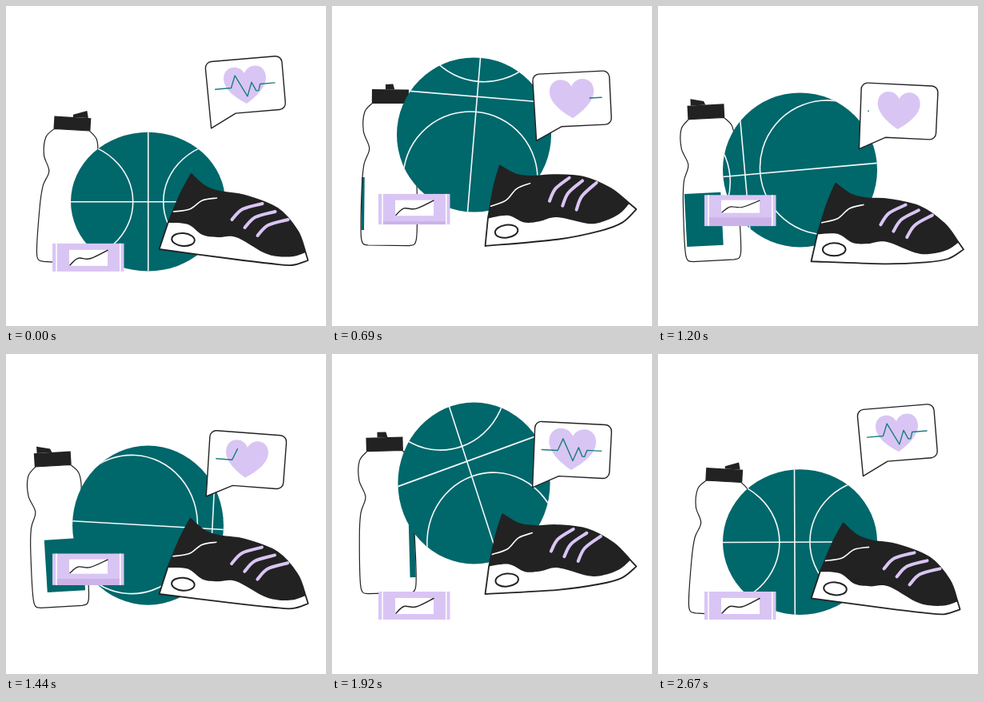
These frames come from a looping animation (400x400 px, 2.7 s). An HTML page with a canvas:

```html
<!DOCTYPE html>
<html lang="en">
<head>
<meta charset="utf-8">
<style>
html, body { margin: 0; width: 100%; height: 100%; overflow: hidden; background: #fff; }
canvas { display: block; }
</style>
</head>
<body>
<canvas id="stage" width="400" height="400"></canvas>
<script>
const ctx = document.getElementById('stage').getContext('2d');
const LOOP = 2700, FIRST_BOUNCE = 1335;
const TEAL = '#00676b', BLACK = '#222', LILAC = '#d9c5f4', LILAC_DARK = '#cbb3ea', WHITE = '#fff';
const { sin, cos, abs, max, min, PI } = Math;
const rad = deg => deg * PI / 180;
const clamp = (v, lo, hi) => max(lo, min(hi, v));
const ease = (t, from, to) => {
  const u = clamp((t - from) / (to - from), 0, 1);
  return u * u * (3 - 2 * u);
};
// 0 at the apex of a bounce, 1 on the ground.
const drop = (p, apex, power) => (abs(p - apex) / (p < apex ? apex : 1 - apex)) ** power;
// 1 at the moment of landing, 0 in the air.
const impact = (p, from, to, release) => ease(p, from, to) + 1 - ease(p, 0, release);

// Adds a smooth line through the points to the current path.
function spline(pts) {
  const at = i => pts[clamp(i, 0, pts.length - 1)];
  ctx.lineTo(...pts[0]);
  for (let i = 0; i < pts.length - 1; i++) {
    const [p, a, b, q] = [at(i - 1), at(i), at(i + 1), at(i + 2)];
    ctx.bezierCurveTo(
      a[0] + (b[0] - p[0]) / 6, a[1] + (b[1] - p[1]) / 6,
      b[0] - (q[0] - a[0]) / 6, b[1] - (q[1] - a[1]) / 6, ...b);
  }
}

function paint(fill, stroke, width) {
  if (fill) { ctx.fillStyle = fill; ctx.fill(); }
  if (stroke) { ctx.strokeStyle = stroke; ctx.lineWidth = width; ctx.stroke(); }
}

function shape(draw, ...style) {
  ctx.beginPath();
  draw();
  paint(...style);
}

function rect(x, y, w, h, color) {
  ctx.fillStyle = color;
  ctx.fillRect(x, y, w, h);
}

function place(x, y, angle, draw) {
  ctx.save();
  ctx.translate(x, y);
  ctx.rotate(angle);
  draw();
  ctx.restore();
}

function bottle(t, p, phase) {
  const facing = cos(phase);
  const y = 299 + 31 * drop(p, .44, 2.4) - 9 * impact(p, .97, 1, .12);
  place(71 + 1.5 * facing, y, rad(3.5 * cos(phase - rad(12))), () => {
    ctx.scale(1, 1 - .065 * impact(p, .9, .97, .1));
    const side = [[22, -178], [32, -166], [33, -142], [25.5, -121], [32, -101], [34.5, -70], [34.5, -9], [26, 0]];
    shape(() => {
      spline(side);
      spline(side.map(([x, y]) => [-x, y]).reverse());
      ctx.closePath();
    }, WHITE);
    const edge = deg => 34.5 * sin(rad(clamp(deg, -90, 90)));
    const turn = .17 * (t - 1440), left = edge(turn - 29);
    rect(left, -85, edge(turn + 63) - left, 66, TEAL);
    paint(null, BLACK, 1.2);
    rect(-23, -195, 46, 17, BLACK);
    const x = 10 * facing, half = 5.5 + 4 * abs(facing), tilt = 2.5 * facing;
    shape(() => {
      ctx.moveTo(x - half, -195);
      ctx.lineTo(x - half, -201 + tilt);
      ctx.lineTo(x + half - 2, -202 - tilt);
      ctx.lineTo(x + half, -195);
    }, BLACK);
  });
}

function ball(t, p) {
  const R = 96.5, ring = 84, gap = 206;
  const stretch = ease(p, 0, .13) - ease(p, .335, .51);
  const squash = impact(p, .952, 1, .13);
  const turn = PI * (ease(p, 0, 1) + (t >= FIRST_BOUNCE));
  const roll = 3 * gap * t / LOOP % gap;
  place(177.5, 161 + 84 * drop(p, .515, 2.8), 0, () => {
    ctx.scale(1 - .033 * stretch, 1 + .104 * stretch - .1 * squash);
    shape(() => ctx.arc(0, 0, R, 0, 2 * PI), TEAL);
    ctx.clip();
    ctx.rotate(turn);
    shape(() => {
      ctx.moveTo(-R, 0);
      ctx.lineTo(R, 0);
      for (let x = roll - gap; x < R; x += gap) {
        ctx.moveTo(x, -R);
        ctx.lineTo(x, R);
      }
      for (let x = roll - 1.5 * gap; x < R + ring; x += gap) {
        ctx.moveTo(x + ring, 0);
        ctx.arc(x, 0, ring, 0, 2 * PI);
      }
    }, null, '#f4fafa', 1.6);
  });
}

function bar(t) {
  const hop = 63.5 * max(0, 1 - abs(t / 920 - 1) ** 2.2);
  const tilt = rad(37 * (ease(t, 450, 1050) - ease(t, 1200, 1860)));
  const face = 35 * cos(tilt), strip = 18 * sin(tilt), height = face + strip;
  place(58, 314.5 - hop - height / 2, 0, () => {
    rect(0, 0, 89.5, height, LILAC);
    rect(5, face, 79, strip, LILAC_DARK);
    for (const x of [4.3, 84]) rect(x, 0, 1.5, height, WHITE);
    ctx.scale(1, cos(tilt));
    rect(21, 8, 48, 20, WHITE);
    shape(() => spline([[22, 27], [32, 18.5], [47, 19], [69, 8.5]]), null, BLACK, 1.5);
  });
}

function heart(p) {
  const size = 1 + .12 * cos(PI / 2 * clamp((p - .385) / .23, -1, 1)) ** 2;
  ctx.save();
  ctx.scale(size, size);
  shape(() => {
    for (const side of [1, -1]) {
      ctx.moveTo(0, 23);
      ctx.bezierCurveTo(side * 10, 17, side * 26.5, 5, side * 26.5, -9);
      ctx.bezierCurveTo(side * 26.5, -26, side * 6, -28, 0, -15);
    }
  }, LILAC);
  ctx.restore();
}

function pulse(t) {
  const length = 126.6;
  const hidden = length * ease(t, 0, 880);
  const drawn = length * ease(t, 1170, 1950);
  const [from, to] = t < 1000 ? [hidden, length] : [0, drawn];
  if (to - from < .1) return;
  ctx.setLineDash([to - from, 400]);
  ctx.lineDashOffset = -from;
  shape(() => {
    for (const point of [[-38, 2], [-18, 2], [-12, -13], [1.5, 14], [8, -3], [13, 8], [16, 8], [18.5, 0], [37, 0]])
      ctx.lineTo(...point);
  }, null, '#1b7d80', 1.4);
}

function bubble(t, p, phase) {
  const tilt = rad(-.5 - 5 * cos(phase - rad(30)));
  place(300 - .8 * cos(phase), 115.5 - 16.5 * cos(phase), tilt, () => {
    shape(() => {
      ctx.moveTo(-47, 50);
      ctx.arcTo(-48, -33, 0, -33, 8);
      ctx.arcTo(48, -33, 48, 0, 8);
      ctx.arcTo(48, 34, 0, 34, 8);
      ctx.lineTo(-15, 34);
      ctx.closePath();
    }, WHITE, BLACK, 1.4);
    heart(p);
    pulse(t);
  });
}

function shoe(p) {
  const fall = ease(p, .8, .98);
  const y = 300 + 28 * (ease(p, .55, .82) - ease(p, .84, 1)) + 4 * impact(p, .9, .97, .08);
  const turn = -13.5 * (ease(p, 0, .6) - fall);
  const curl = -24 * (ease(p, .1, .75) - fall);
  // Points are measured from the heel; the toe end bends up and back.
  const flex = pts => pts.map(([x, y]) => {
    const u = max(0, x - 90) / 96, lift = curl * u * u, slope = 2 * curl * u / 96;
    return [x - .2 * lift - y * slope, y + lift];
  });
  const back = [[11, -33], [27, -70], [40, -94]];
  const top = flex([[40, -94], [57, -79], [76, -72], [108, -67], [148, -51], [173, -23], [183, 4]]);
  const seam = flex([[183, 4], [168, 9], [148, 9], [130, 4], [96, -15], [73, -15], [54, -18], [36, -31], [11, -33]]);
  const sole = flex([[186, 14], [166, 20], [140, 18], [90, 12], [0, 0]]);

  place(191.5, y, rad(turn), () => {
    shape(() => {
      ctx.moveTo(0, 0);
      spline(back);
      spline(top);
      spline(sole);
      ctx.closePath();
    }, WHITE, BLACK, 1.8);
    shape(() => {
      spline(back);
      spline(top);
      spline(seam);
    }, BLACK);
    shape(() => spline([[18, -47], [38, -50], [54, -61], [72, -64]]), null, WHITE, 1.6);
    for (let i = 0; i < 3; i++) {
      const lace = [[91, -37], [104, -50], [129, -57]].map(([x, y]) => [x + 16 * i, y + 10 * i]);
      shape(() => spline(flex(lace)), null, LILAC, 4);
    }
    shape(() => ctx.ellipse(30, -12, 14.3, 8, rad(5), 0, 2 * PI), null, BLACK, 2);
  });
}

function frame(now) {
  const t = now % LOOP, phase = 2 * PI * t / LOOP;
  const p = t < FIRST_BOUNCE ? t / FIRST_BOUNCE : (t - FIRST_BOUNCE) / (LOOP - FIRST_BOUNCE);
  rect(0, 0, 400, 400, WHITE);
  bottle(t, p, phase);
  ball(t, p);
  bar(t);
  bubble(t, p, phase);
  shoe(p);
  requestAnimationFrame(frame);
}

ctx.lineCap = ctx.lineJoin = 'round';
frame(performance.now());
</script>
</body>
</html>
```
